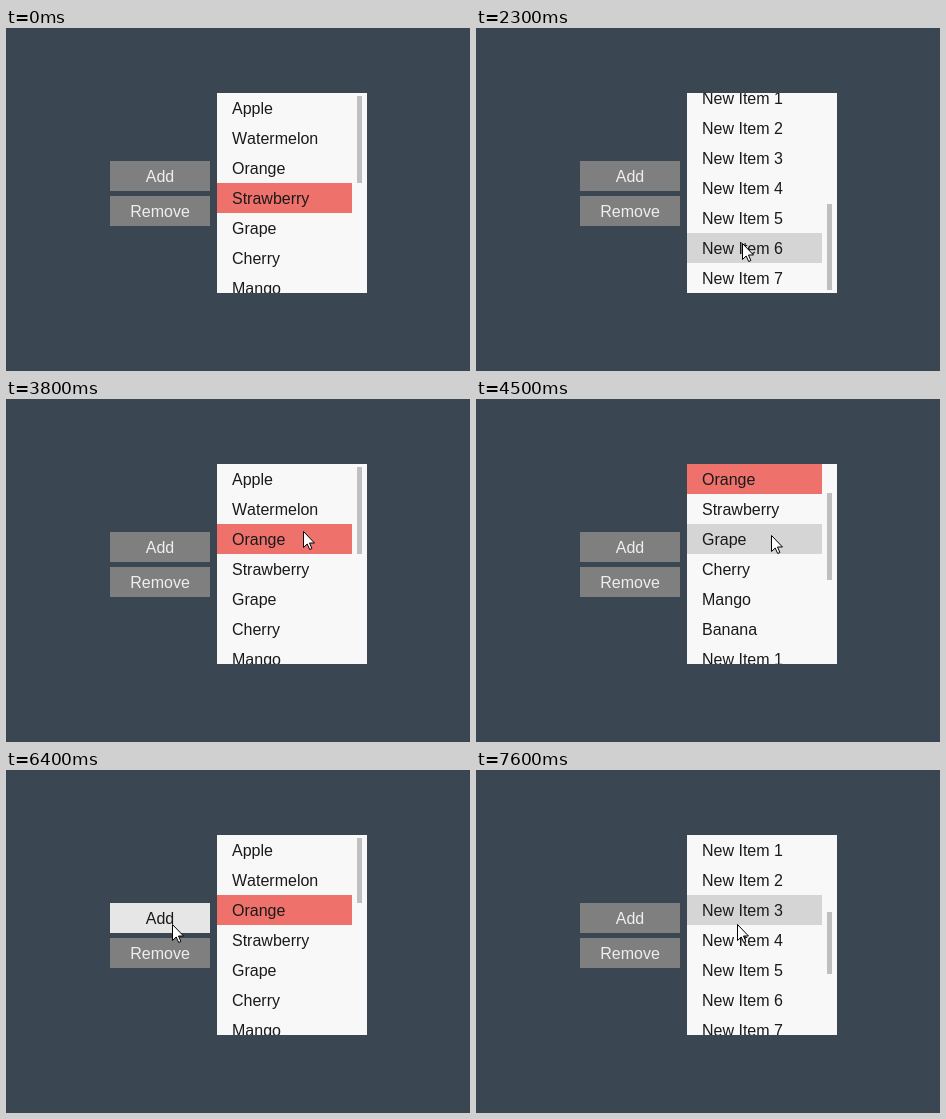
An HTML page that plays this animation: 464x343 px, repeating every 8 s.

```html
<!DOCTYPE html>
<html lang="en">
<head>
<meta charset="utf-8">
<title>Fruit list</title>
<style>
  html, body { margin: 0; width: 100%; height: 100%; overflow: hidden; background: #3b4653; }
  svg { display: block; }
  text { font: 16px "Liberation Sans", Arial, sans-serif; font-kerning: none; fill: #1a1a1a; }
  .button rect { fill: #7f7f7f; }
  .button text { fill: #eee; text-anchor: middle; }
  .button.hover rect { fill: #e6e6e6; }
  .button.press rect { fill: #cecece; }
  .button.hover text { fill: #1a1a1a; }
</style>
</head>
<body>
<svg width="464" height="343" viewBox="0 0 464 343">
  <g class="button" id="add" transform="translate(104 133)">
    <rect width="100" height="30"/><text x="50" y="21">Add</text>
  </g>
  <g class="button" transform="translate(104 168)">
    <rect width="100" height="30"/><text x="50" y="21">Remove</text>
  </g>
  <svg x="211" y="65" width="150" height="200" overflow="hidden">
    <rect width="150" height="200" fill="#f8f8f8"/>
    <g id="rows">
      <rect id="hover" width="135" height="30" fill="#d5d5d5"/>
      <rect id="selected" width="135" height="30" fill="#ee716b"/>
    </g>
    <rect id="thumb" x="140" width="5" fill="#bfbfbf"/>
  </svg>
  <path id="cursor" d="M.5.5v16L4.2 13l2.5 5.5 2.2-1L6.5 12h5z" fill="#fff" stroke="#000"/>
</svg>
<script>
const LOOP = 8000, TICK = 100;
const ROW = 30, VIEW = 200, TRACK = 194, NOTCH = 60;
const LIST = { x: 211, y: 65, w: 135, h: VIEW };
const ADD = { x: 104, y: 133, w: 100, h: 30 };
const ENTER = 200, FOCUS = 900, SELECT = 1000;

const fruits = ['Apple', 'Watermelon', 'Orange', 'Strawberry', 'Grape', 'Cherry', 'Mango', 'Banana'];
const clicks = { start: 5500, every: 220, count: 6, press: 150 };
const startCount = 15;

// Wheel bursts, one notch per tick; a negative count scrolls up.
const bursts = [
  { at: 1700, n: 5 }, { at: 2700, n: -1 }, { at: 3000, n: -4 },
  { at: 4000, n: 3 }, { at: 4400, n: -3 }, { at: 7300, n: 4 }
];

// Pointer moves: when, how long, where to.
const entry = { x: 391, y: 93 };
const moves = [
  { at: ENTER, ms: 300, x: 295, y: 129 },
  { at: 1100, ms: 100, x: 294, y: 129 },
  { at: 1900, ms: 400, x: 266, y: 215 },
  { at: 2900, ms: 600, x: 296, y: 154 },
  { at: 3600, ms: 200, x: 297, y: 132 },
  { at: 4300, ms: 400, x: 292, y: 140 },
  { at: 4800, ms: 400, x: 168, y: 152 },
  { at: 5600, ms: 600, x: 166, y: 154 },
  { at: 6600, ms: 600, x: 261, y: 160 },
  { at: 7500, ms: 100, x: 261, y: 154 }
];

const $ = id => document.getElementById(id);
const clamp = (v, lo, hi) => Math.min(hi, Math.max(lo, v));
const ease = k => k * k * (3 - 2 * k);
const inside = (p, box) =>
  p.x >= box.x && p.x < box.x + box.w && p.y >= box.y && p.y < box.y + box.h;
const set = (el, attrs) => {
  for (const key in attrs) el.setAttribute(key, attrs[key]);
};
const show = (el, on) => { el.style.display = on ? '' : 'none'; };

const labels = Array.from({ length: startCount + clicks.count }, (_, i) => {
  const label = document.createElementNS('http://www.w3.org/2000/svg', 'text');
  set(label, { x: 15, y: i * ROW + 21 });
  label.textContent = fruits[i] || `New Item ${i - fruits.length + 1}`;
  return $('rows').appendChild(label);
});

function pointerAt(t) {
  const { x, y } = moves.reduce((p, m) => {
    const k = ease(clamp((t - m.at) / m.ms, 0, 1));
    return { x: p.x + (m.x - p.x) * k, y: p.y + (m.y - p.y) * k };
  }, entry);
  return { x: Math.round(x), y: Math.round(y) };
}

function scrollAt(t, max) {
  return bursts.reduce((pos, { at, n }) => {
    const turned = clamp(Math.floor((t - at) / TICK) + 1, 0, Math.abs(n));
    return clamp(pos + Math.sign(n) * turned * NOTCH, 0, max);
  }, 0);
}

function render(t) {
  const sinceClick = t - clicks.start;
  const added = clamp(Math.floor(sinceClick / clicks.every) + 1, 0, clicks.count);
  const count = startCount + added;
  const content = count * ROW;
  const scroll = scrollAt(t, content - VIEW);
  const pointer = pointerAt(t);

  labels.forEach((label, i) => show(label, i < count));
  set($('rows'), { transform: `translate(0 ${-scroll})` });
  set($('selected'), { y: (t < SELECT ? 3 : 2) * ROW });

  const top = Math.ceil(TRACK * scroll / content);
  const bottom = Math.ceil(TRACK * (scroll + VIEW) / content);
  set($('thumb'), { y: 3 + top, height: bottom - top });

  show($('hover'), t >= FOCUS && inside(pointer, LIST));
  set($('hover'), { y: Math.floor((pointer.y - LIST.y + scroll) / ROW) * ROW });

  const onAdd = inside(pointer, ADD);
  const pressed = added > 0 && added < clicks.count && sinceClick % clicks.every > clicks.press;
  $('add').classList.toggle('hover', onAdd);
  $('add').classList.toggle('press', onAdd && pressed);

  show($('cursor'), t >= ENTER);
  set($('cursor'), { transform: `translate(${pointer.x} ${pointer.y})` });
}

const start = performance.now();
function frame() {
  const t = (performance.now() - start) % LOOP;
  render(Math.floor(t / TICK) * TICK);
  requestAnimationFrame(frame);
}
frame();
</script>
</body>
</html>
```
